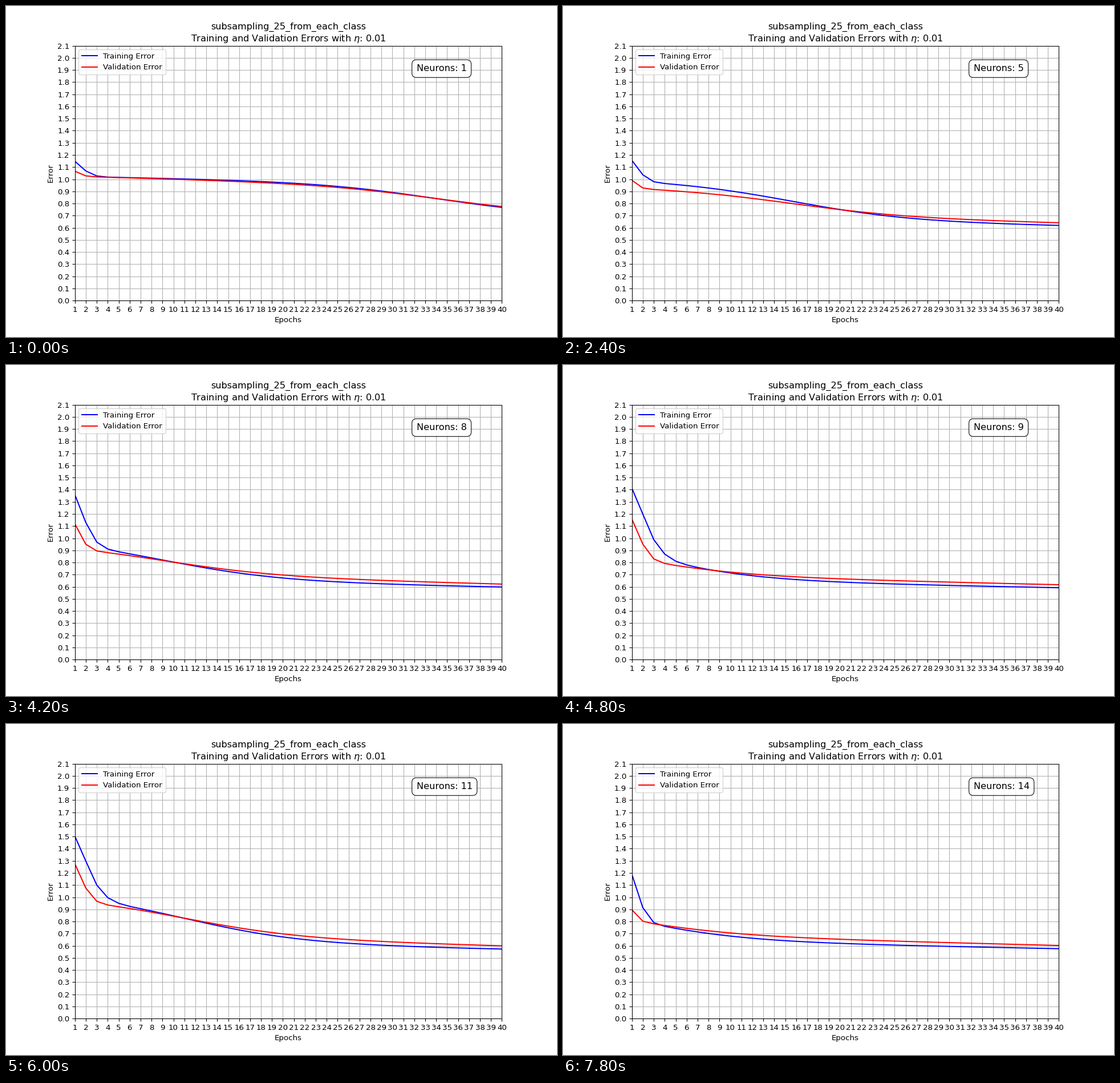
Recreate the animation shown at these times as a matplotlib script. Size 966 px wide and 580 px high, loop 8 s.

```python
import matplotlib.pyplot as plt
import numpy as np
from matplotlib.animation import FuncAnimation

WIDTH, HEIGHT, DPI = 966, 580, 96.6
FRAMES, INTERVAL = 40, 200
FRAMES_PER_STEP = 3

EPOCHS = np.arange(1, 41)
LEFT = (40 - EPOCHS) / 39   # share of the run still to come
FALL_WIDTH = 5.5            # epochs over which the main descent spreads

# neurons: training start, validation start, training end,
#          size and middle of the main descent,
#          early excess kept per epoch, validation's share of the descent
KEY_RUNS = {
    1: (1.148, 1.066, .768, .25, 34, .38, .82),
    2: (1.120, 1.000, .617, .34, 15, .38, .66),
    3: (1.104, .975, .618, .34, 15, .37, .65),
    6: (1.181, .999, .620, .31, 16, .33, .68),
    8: (1.358, 1.118, .598, .34, 9, .48, .73),
    9: (1.412, 1.158, .592, .50, 0, .64, .60),
    11: (1.503, 1.275, .573, .41, 11, .62, .78),
    14: (1.188, .896, .576, .37, 0, .32, .70),
}


def params(neurons):
    """Parameters of a run, interpolated between the key runs."""
    counts = list(KEY_RUNS)
    return [np.interp(neurons, counts, col) for col in zip(*KEY_RUNS.values())]


def with_start(slow, start, keep):
    """Add the quickly fading excess of the first epochs."""
    return slow + (start - slow[0]) * keep ** ((EPOCHS - 1) ** 1.5)


def errors(neurons):
    start_t, start_v, end, drop, mid, keep, share = params(neurons)
    sigmoid = 1 / (1 + np.exp((EPOCHS - mid) / FALL_WIDTH))
    descent = drop * (sigmoid - sigmoid[-1]) + 0.068 * LEFT
    gap = 0.024 - 0.1 * (end - 0.6)
    train = with_start(end + descent, start_t, keep)
    valid = with_start(end + gap + share * descent + 0.04 * LEFT,
                       start_v, keep ** 2)
    return train, valid


# The small margin keeps the pixel size from being rounded down
fig, ax = plt.subplots(figsize=((WIDTH + 0.01) / DPI, (HEIGHT + 0.01) / DPI),
                       dpi=DPI)
train_line, = ax.plot([], [], color="blue", label="Training Error")
valid_line, = ax.plot([], [], color="red", label="Validation Error")
ax.set_title("subsampling_25_from_each_class\n"
             r"Training and Validation Errors with $\eta$: 0.01")
ax.set_xlabel("Epochs")
ax.set_ylabel("Error")
ax.set_xlim(1, 40)
ax.set_ylim(0, 2.1)
ax.set_xticks(EPOCHS)
ax.set_yticks(np.arange(22) / 10)
ax.grid(True)
ax.legend(loc="upper left")
label = ax.text(0.8, 0.9, "", transform=ax.transAxes, fontsize=12,
                bbox=dict(facecolor="white", alpha=0.8,
                          boxstyle="round,pad=0.5"))


def update(frame):
    neurons = 1 + frame // FRAMES_PER_STEP
    train, valid = errors(neurons)
    train_line.set_data(EPOCHS, train)
    valid_line.set_data(EPOCHS, valid)
    label.set_text(f"Neurons: {neurons}")
    return train_line, valid_line, label


anim = FuncAnimation(fig, update, frames=FRAMES, interval=INTERVAL,
                     repeat=True, repeat_delay=0, blit=False)
plt.show()
```
